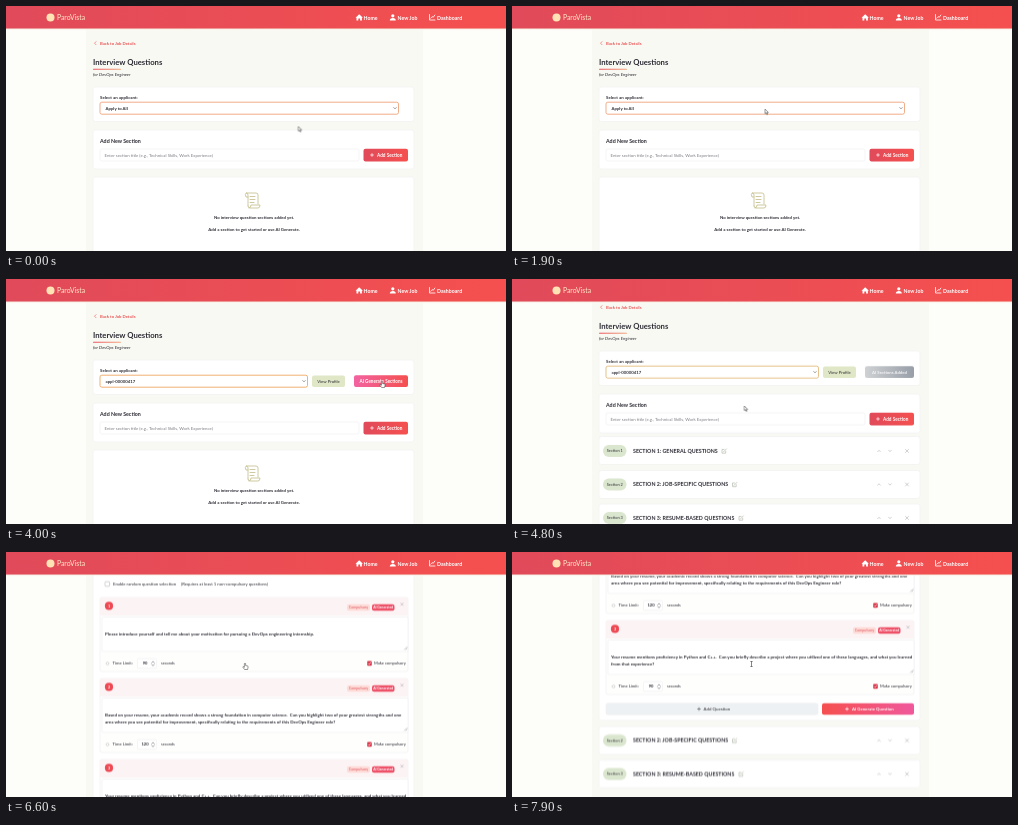
An HTML page for the animation above (8 s loop, 500 by 245 pixels).

```html
<!DOCTYPE html>
<html lang="en">
<head>
<meta charset="utf-8">
<title>Interview Questions</title>
<style>
html, body { margin: 0; width: 100%; height: 100%; overflow: hidden; background: #fdfdf9; }
svg { display: block; width: 100vw; height: 100vh; }
text { font-family: Lato, "Open Sans", sans-serif; fill: #2a2a33; white-space: pre; }
.b { font-weight: 700; }
.line { fill: none; stroke-linecap: round; stroke-linejoin: round; }

.page, .rest, .grow, .fade, .cursor, .plain, .chosen, .added, .empty, .arrow, .hand, .beam {
  animation: 8s linear infinite;
}
.page { animation-name: scroll; }
.rest { animation-name: push; }
.grow { animation-name: grow; }
.fade { animation-name: fade; }
.cursor { animation-name: move; animation-timing-function: ease-in-out; }
.plain, .chosen, .added, .empty, .arrow, .hand, .beam { animation-timing-function: step-end; }
.plain { animation-name: plain; }
.chosen { animation-name: chosen; }
.added { animation-name: added; }
.empty { animation-name: empty; }
.arrow { animation-name: arrow; }
.hand { animation-name: hand; }
.beam { animation-name: beam; }

@keyframes scroll {
  0%, 57.5% { transform: translateY(0); }
  60% { transform: translateY(-9px); }
  67.5%, 75% { transform: translateY(-70.5px); animation-timing-function: ease-in-out; }
  81.25%, 87.5% { transform: translateY(-172.5px); animation-timing-function: ease-in-out; }
  96.25%, 100% { transform: translateY(-311.5px); }
}
@keyframes push {
  0%, 70% { transform: translateY(0); }
  71.25% { transform: translateY(47px); animation-timing-function: ease-out; }
  75%, 100% { transform: translateY(285.5px); }
}
@keyframes grow {
  0%, 70% { height: 28px; }
  71.25% { height: 75px; animation-timing-function: ease-out; }
  75%, 100% { height: 313.5px; }
}
@keyframes fade {
  0%, 70% { opacity: 0; }
  71.25% { opacity: .35; }
  75%, 100% { opacity: 1; }
}
@keyframes move {
  0%, 10% { transform: translate(292.3px, 120.5px); }
  12.5% { transform: translate(291.5px, 120.5px); }
  18%, 22% { transform: translate(258px, 102px); }
  28%, 38% { transform: translate(230px, 108px); }
  44%, 51% { transform: translate(376px, 102px); }
  58%, 61% { transform: translate(232.3px, 127px); }
  67%, 100% { transform: translate(239px, 111px); }
}
@keyframes plain { 0% { opacity: 1; } 25%, 100% { opacity: 0; } }
@keyframes chosen { 0% { opacity: 0; } 25% { opacity: 1; } 51.25%, 100% { opacity: 0; } }
@keyframes added { 0% { opacity: 0; } 51.25%, 100% { opacity: 1; } }
@keyframes empty { 0% { opacity: 1; } 51.25%, 100% { opacity: 0; } }
@keyframes arrow { 0% { opacity: 1; } 43% { opacity: 0; } 52% { opacity: 1; } 67%, 100% { opacity: 0; } }
@keyframes hand { 0% { opacity: 0; } 43% { opacity: 1; } 52% { opacity: 0; } 67% { opacity: 1; } 90%, 100% { opacity: 0; } }
@keyframes beam { 0% { opacity: 0; } 90%, 100% { opacity: 1; } }
</style>
</head>
<body>
<svg id="stage" viewBox="0 0 500 245" preserveAspectRatio="none"></svg>
<script>
const text = (x, y, size, str, attrs = '') => `<text x="${x}" y="${y}" font-size="${size}" ${attrs}>${str}</text>`;
const bold = (x, y, size, str, attrs = '') => text(x, y, size, str, 'class="b" ' + attrs);
const rect = (x, y, w, h, r, fill, attrs = '') =>
  `<rect x="${x}" y="${y}" width="${w}" height="${h}" rx="${r}" fill="${fill}" ${attrs}/>`;
const line = (d, color, width = .6) => `<path class="line" d="${d}" stroke="${color}" stroke-width="${width}"/>`;
const group = (name, ...parts) => `<g class="${name}">${parts.join('')}</g>`;
const mid = 'text-anchor="middle"';
const white = 'style="fill:#fff"';
const midWhite = `${mid} ${white}`;
const edge = 'stroke="#eeeef0" stroke-width=".6"';
const card = (y, h, attrs = '') => rect(87, y, 321, h, 2.5, '#fff', `${edge} ${attrs}`);
const cross = (x, y, r = 1.5) => line(`M${x - r} ${y - r}l${2 * r} ${2 * r}m0 ${-2 * r}l${-2 * r} ${2 * r}`, '#a3a3a8', .5);
const plus = (x, y, color) => line(`M${x - 1.4} ${y}h2.8m-1.4-1.4v2.8`, color, .7);
const chevron = (x, y, up, color = '#66666c') =>
  line(`M${x - 1.3} ${y + (up ? .7 : -.7)}l1.3 ${up ? -1.4 : 1.4}l1.3 ${up ? 1.4 : -1.4}`, color, .6);

function select(width, label, border) {
  return rect(94, 96.2, width, 12, 1.8, '#fff', `stroke="${border}" stroke-width=".9"`) +
    bold(99.5, 103.8, 4.3, label) + chevron(94 + width - 3.5, 102.2, false);
}

function profileButton(x) {
  return rect(x, 96.5, 33, 11.5, 2, '#dfe7c6') + text(x + 16.5, 103.7, 4.3, 'View Profile', mid);
}

function sectionRow(n, title, y, editX) {
  return rect(91, y - 6, 23.5, 12, 6, '#dbe6cf') +
    text(102.8, y + 1.3, 3.9, 'Section ' + n, mid) +
    bold(121, y + 1.9, 5.3, `SECTION ${n}: ${title} QUESTIONS`) +
    line(`M${editX} ${y - 1.5}h-2v3.7h3.7v-2m-2.3 .7l3-3`, '#a9b3a2', .6) +
    chevron(367, y, true, '#b4b4ba') + chevron(378, y, false, '#b4b4ba') + cross(395, y);
}

function question(n, seconds, lines) {
  const y = 226 + 81 * (n - 1);
  return rect(94, y - 8, 308, 74, 2, '#fefefd', edge) +
    rect(94, y - 8, 308, 18, 2, '#fcf3f4') +
    `<circle cx="103" cy="${y + .4}" r="4.1" fill="#ee4a54"/>` +
    bold(103, y + 1.7, 3.8, n, midWhite) +
    rect(341, y - 1.3, 23, 6.6, 2, '#fddcd8') +
    text(352.5, y + 3.2, 3.7, 'Compulsory', mid + ' style="fill:#e2525c"') +
    rect(366, y - 1.3, 22.5, 6.6, 2, '#ee5068') +
    bold(377.2, y + 3.2, 3.4, 'AI Generated', midWhite) +
    cross(396, y - 1.3, 1.2) +
    rect(96, y + 11.5, 306, 34.5, 1.5, '#fff', edge) +
    lines.map((s, i) => bold(99, y + 30.4 + 6.4 * i, 4.45, s)).join('') +
    line(`M398.5 ${y + 44}l2.5-2.5m-1 2.5l1-1`, '#77777c', .4) +
    `<circle cx="101.5" cy="${y + 58}" r="1.4" fill="none" stroke="#b6b6ba" stroke-width=".5"/>` +
    text(106.5, y + 59.4, 4.2, 'Time Limit:') +
    rect(131.5, y + 53.2, 19, 9.6, 1.2, '#fff', edge) +
    bold(139, y + 59.4, 4.1, seconds, mid) +
    chevron(147, y + 56.6, true) + chevron(147, y + 59.6, false) +
    text(155, y + 59.4, 3.9, 'seconds') +
    rect(361.2, y + 55.6, 4.6, 4.6, .8, '#d9364a') +
    line(`M362.3 ${y + 58}l.9 .9l1.6-2`, '#fff', .6) +
    text(368, y + 59.4, 4.1, 'Make compulsory');
}

const intro = [
  line('M90 35.7l-1.5 1.5l1.5 1.5', '#e95050', .6),
  bold(94, 38.6, 4.2, 'Back to Job Details', 'style="fill:#e95050"'),
  bold(87, 59.4, 7.7, 'Interview Questions'),
  rect(87, 62.8, 28, 1, .5, 'url(#warm)'),
  text(87, 69.6, 4.4, 'for DevOps Engineer', 'font-style="italic"'),
  card(81, 34.5),
  bold(94, 93, 4.4, 'Select an applicant:'),
  group('plain', select(298.5, 'Apply to All', '#f0a47c')),
  group('chosen', select(207.5, 'appl-00000417', '#f0a662'), profileButton(306),
    rect(348, 96.3, 54, 11.8, 2, 'url(#pink)'), bold(375, 103.8, 4.6, 'AI Generate Sections', midWhite)),
  group('added', select(212.5, 'appl-00000417', '#e4ba7c'), profileButton(311),
    rect(353, 96.3, 49, 11.8, 2, 'url(#grey)'), bold(377.5, 103.8, 4.3, 'AI Sections Added', `${mid} style="fill:#f6f6fa"`)),
  card(124, 39),
  bold(94, 136.6, 5.3, 'Add New Section'),
  rect(94, 143, 259, 12, 1.8, '#fff', edge),
  text(98.5, 150.7, 4.35, 'Enter section title (e.g., Technical Skills, Work Experience)', 'style="fill:#7d7d85"'),
  rect(357.5, 142.8, 44.5, 12.6, 2, 'url(#bar)'),
  plus(366, 149, '#fff'),
  bold(371, 150.7, 4.7, 'Add Section', white)
].join('');

const emptyState = group('empty',
  card(171, 82),
  line('M242 200v-11q0-2-2-2h10q2 0 2 2v9m-12-11q-1.5 1 0 4h2m0 9q0 2 2 2h8q2 0 2-3h-9q0 3-2 3m1-11.5h5m-5 3h5m-5 3h4', '#c9c393', .9),
  bold(248, 213.2, 4.3, 'No interview question sections added yet.', mid),
  bold(248, 225.2, 4.35, 'Add a section to get started or use AI Generate.', mid));

const openContent = group('fade',
  rect(99, 202.2, 4.6, 4.6, .8, '#fff', 'stroke="#a9a9ae" stroke-width=".5"'),
  text(107, 205.9, 4.25, 'Enable random question selection'),
  text(175, 205.9, 4.25, '(Requires at least 1 non-compulsory questions)'),
  question(1, 90, ['Please introduce yourself and tell me about your motivation for pursuing a DevOps engineering internship.']),
  question(2, 120, [
    'Based on your resume, your academic record shows a strong foundation in computer science.  Can you highlight two of your greatest strengths and one',
    'area where you see potential for improvement, specifically relating to the requirements of this DevOps Engineer role?']),
  question(3, 90, [
    'Your resume mentions proficiency in Python and C++.  Can you briefly describe a project where you utilized one of these languages, and what you learned',
    'from that experience?']),
  rect(94, 462.8, 212, 11.4, 2, '#eef1f3', edge),
  plus(187, 468.5, '#66666c'),
  text(191.5, 470, 4.4, 'Add Question'),
  rect(310, 462.8, 92, 11.4, 2, 'url(#redpink)'),
  plus(335, 468.5, '#fff'),
  bold(340, 470, 4.3, 'AI Generate Question', white));

const sections = group('added',
  card(166.5, 28, 'class="grow"'),
  sectionRow(1, 'GENERAL', 181, 212),
  `<g clip-path="url(#open)">${openContent}</g>`,
  group('rest',
    card(200.5, 28), sectionRow(2, 'JOB-SPECIFIC', 214.5, 222.5),
    card(234, 28), sectionRow(3, 'RESUME-BASED', 248, 229)));

const header = [
  rect(0, 22, 500, 3, 0, 'url(#shade)'),
  rect(0, 0, 500, 22.5, 0, 'url(#bar)'),
  '<circle cx="44.5" cy="11.5" r="4" fill="#ffe3b4"/>',
  text(51, 14, 6.8, 'ParoVista', 'style="fill:#ffeacb"'),
  '<path d="M349.5 11.7l3.7-3.4l3.7 3.4h-1v2.8h-1.8v-2h-1.8v2h-1.8v-2.8z" fill="#fff"/>',
  bold(357.5, 13.6, 5.2, 'Home', white),
  '<circle cx="386.8" cy="9.8" r="1.6" fill="#fff"/><path d="M383.8 14.5q0-2.6 3-2.6t3 2.6z" fill="#fff"/>',
  bold(391.5, 13.6, 5.2, 'New Job', white),
  line('M423.5 8.5v5.5h5.5m-4.2-1.8l1.4-1.6l1 .8l1.6-2.3', '#fff', .8),
  bold(431, 13.6, 5.2, 'Dashboard', white)
].join('');

const cursor = group('cursor',
  '<path class="arrow" d="M0 0v4.6l1.1-1l.8 1.9l.8-.4l-.8-1.8h1.5z" fill="#fff" stroke="#333" stroke-width=".5"/>',
  '<path class="hand" d="M-.6 .5q.6-.9 1.2 0v2l2 .5q.7.2.5 1l-.5 2.5h-3l-1.7-2.3q-.2-.8.7-.5l.8.6z" fill="#fff" stroke="#333" stroke-width=".5"/>',
  '<path class="beam" d="M-.6-1.5h2.2m-1.1 0v5m-1.1 0h2.2" fill="none" stroke="#333" stroke-width=".6"/>');

const gradient = (id, from, to, dir = '') =>
  `<linearGradient id="${id}" ${dir}><stop stop-color="${from}"/><stop offset="1" stop-color="${to}"/></linearGradient>`;

document.getElementById('stage').innerHTML =
  '<defs>' +
  gradient('bar', '#e04a5a', '#f5504f') +
  gradient('warm', '#ea4f5c', '#f2a87c') +
  gradient('pink', '#f263a0', '#f5504f') +
  gradient('redpink', '#f5504f', '#f0589c') +
  gradient('grey', '#cfd2d4', '#989ea8') +
  gradient('shade', '#efdccb', '#fdfdf900', 'x2="0" y2="1"') +
  `<clipPath id="open">${rect(87, 166.5, 321, 28, 0, '#000', 'class="grow"')}</clipPath></defs>` +
  rect(0, 0, 500, 245, 0, '#fdfdf9') +
  rect(80, 0, 337, 245, 0, '#f9f9f4') +
  group('page', intro, emptyState, sections) +
  header + cursor;
</script>
</body>
</html>
```
